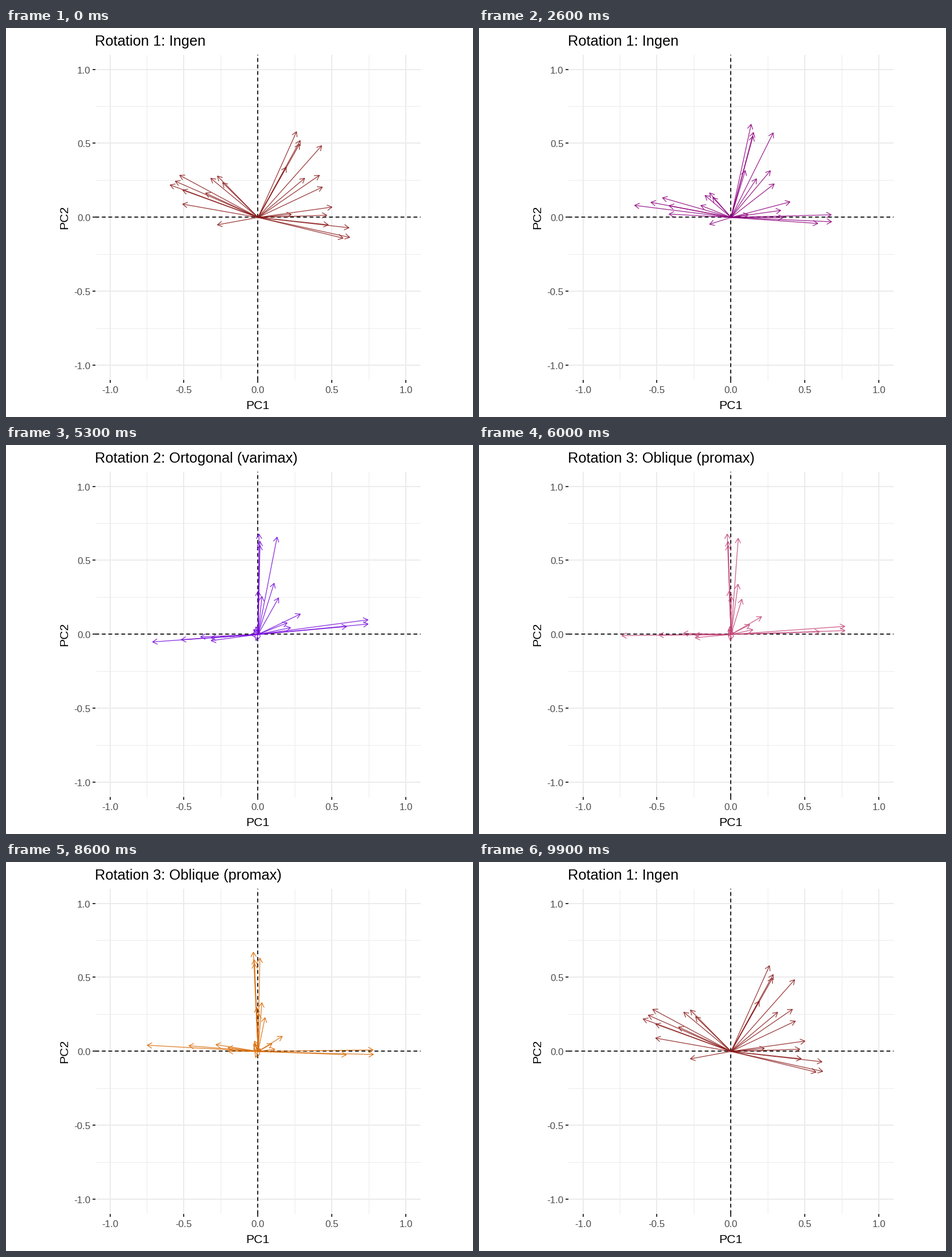
Animation, 820 px wide and 683 px high, one loop 10000 ms. Source, as a matplotlib script:

```python
import numpy as np
import matplotlib.pyplot as plt
from matplotlib.animation import FuncAnimation
from matplotlib.collections import LineCollection

W, H, DPI = 820, 683, 64
FRAMES, INTERVAL = 100, 100
HOLD, PERIOD, STEPS = 19, 33, 14      # timing of the state changes, in frames

ORIGIN = np.array([442.6, 332.6])
UNIT = 259.55                         # pixels per data unit
LEFT, RIGHT, TOP, BOTTOM = 157, 728, 47, 618
BARB, BARB_ANGLE = 9.6, np.radians(30)

TITLES = ["Rotation 1: Ingen",
          "Rotation 2: Ortogonal (varimax)",
          "Rotation 3: Oblique (promax)"]
COLORS = [(139, 26, 26), (93, 0, 235), (222, 112, 0)]

# Unrotated loadings (PC1, PC2); both rotations are derived from them.
LOADINGS = np.array([
    (.26, .58), (.285, .52), (.28, .495), (.43, .485), (.19, .34),
    (.415, .285), (.315, .265), (.435, .205), (.5, .07), (.465, .015),
    (.225, .02), (.475, -.05), (.615, -.07), (.62, -.135), (.575, -.14),
    (-.53, .285), (-.56, .245), (-.595, .22), (-.51, .185), (-.51, .09),
    (-.32, .265), (-.275, .28), (-.24, .235), (-.355, .165), (-.275, -.05)])


def shrink(v, full):
    """Pull loadings below `full` towards zero."""
    return v * np.minimum(1, np.abs(v) / full)


def varimax(loadings):
    x, y = loadings.T
    x2 = 0.74 * np.clip((x / 0.6) ** 5, -1, 1)
    y2 = shrink(y + 0.38 * x, 0.58) + 0.08 * x2
    return np.column_stack([x2, y2])


def promax(rotated):
    x, y = rotated.T
    return np.column_stack([1.08 * shrink(x, 0.64) - 0.08 * y, y - 0.12 * x])


STATES = [LOADINGS, varimax(LOADINGS), promax(varimax(LOADINGS))]

RGB_TO_XYZ = np.array([[0.4124, 0.3576, 0.1805],
                       [0.2126, 0.7152, 0.0722],
                       [0.0193, 0.1192, 0.9505]])
WHITE = RGB_TO_XYZ.sum(axis=1)


def rgb_to_lab(rgb):
    c = np.array(rgb) / 255
    c = np.where(c > 0.04045, ((c + 0.055) / 1.055) ** 2.4, c / 12.92)
    f = RGB_TO_XYZ @ c / WHITE
    f = np.where(f > 0.008856, np.cbrt(f), 7.787 * f + 16 / 116)
    return np.array([116 * f[1] - 16, 500 * (f[0] - f[1]), 200 * (f[1] - f[2])])


def lab_to_rgb(lab):
    fy = (lab[0] + 16) / 116
    f = np.array([fy + lab[1] / 500, fy, fy - lab[2] / 200])
    xyz = np.where(f > 0.2069, f ** 3, (f - 16 / 116) / 7.787) * WHITE
    c = np.clip(np.linalg.solve(RGB_TO_XYZ, xyz), 0, 1)
    c = np.where(c > 0.0031308, 1.055 * c ** (1 / 2.4) - 0.055, 12.92 * c)
    return tuple(np.clip(c, 0, 1))


LABS = [rgb_to_lab(c) for c in COLORS]


def pt(pixels):
    return pixels * 72 / DPI


def to_pixels(points):
    return ORIGIN + np.asarray(points) * (UNIT, -UNIT)


plt.rcParams["font.family"] = "Liberation Sans"
fig = plt.figure(figsize=(W / DPI, H / DPI), dpi=DPI, facecolor="white")
ax = fig.add_axes([0, 0, 1, 1])
ax.set(xlim=(0, W), ylim=(H, 0))
ax.axis("off")


def line(x, y, color, width, z, **kw):
    ax.plot(x, y, color=color, lw=pt(width), zorder=z,
            solid_capstyle="butt", dash_capstyle="butt", **kw)


def text(x, y, s, size, color="black", **kw):
    return ax.text(x, y, s, fontsize=pt(size), color=color, va="baseline", **kw)


def cross(v, color, width, z, **kw):
    x, y = np.floor(to_pixels((v, v)))
    line([x, x], [BOTTOM, TOP], color, width, z, **kw)
    line([LEFT, RIGHT], [y, y], color, width, z, **kw)
    return x, y


def draw_panel():
    for v in np.arange(-0.75, 1, 0.5):
        cross(v, "#ebebeb", 1, 1)
    for v in np.arange(-1, 1.1, 0.5):
        x, y = cross(v, "#ebebeb", 2, 2)
        line([x, x], [BOTTOM, BOTTOM + 5], "#333333", 2, 3)
        line([LEFT - 5, LEFT], [y, y], "#333333", 2, 3)
        label = f"{v:.1f}"
        text(x, 641, label, 17, "#4d4d4d", ha="center")
        text(148.5, y + 7, label, 17, "#4d4d4d", ha="right")

    width = 1.7
    cross(0, "black", width, 4, linestyle=(0, (6.5 / width, 4.9 / width)))
    text(442, 669, "PC1", 21.3, ha="center")
    text(108, 332.5, "PC2", 21.3, ha="center", rotation=90,
         rotation_mode="anchor")


draw_panel()
title = text(156.5, 31, TITLES[0], 25.5)
arrows = LineCollection([], linewidths=pt(1.35), alpha=0.82, zorder=5,
                        capstyle="butt", joinstyle="miter")
ax.add_collection(arrows, autolim=False)


def arrow_paths(tips):
    paths = []
    for tip in tips:
        dx, dy = ORIGIN - tip
        back = np.arctan2(dy, dx)
        barbs = [tip + BARB * np.array([np.cos(a), np.sin(a)])
                 for a in (back + BARB_ANGLE, back - BARB_ANGLE)]
        paths += [np.array([ORIGIN, tip]), np.array([barbs[0], tip, barbs[1]])]
    return paths


def update(frame):
    state, step = divmod(max(frame - HOLD, 0), PERIOD)
    t = min(step / STEPS, 1)
    after = (state + 1) % len(STATES)
    tips = (1 - t) * STATES[state] + t * STATES[after]
    arrows.set_segments(arrow_paths(to_pixels(tips)))
    arrows.set_color(lab_to_rgb((1 - t) * LABS[state] + t * LABS[after]))
    title.set_text(TITLES[state if t <= 0.5 else after])
    return arrows, title


anim = FuncAnimation(fig, update, frames=FRAMES, interval=INTERVAL,
                     repeat=True, repeat_delay=0, blit=False)
plt.show()
```
